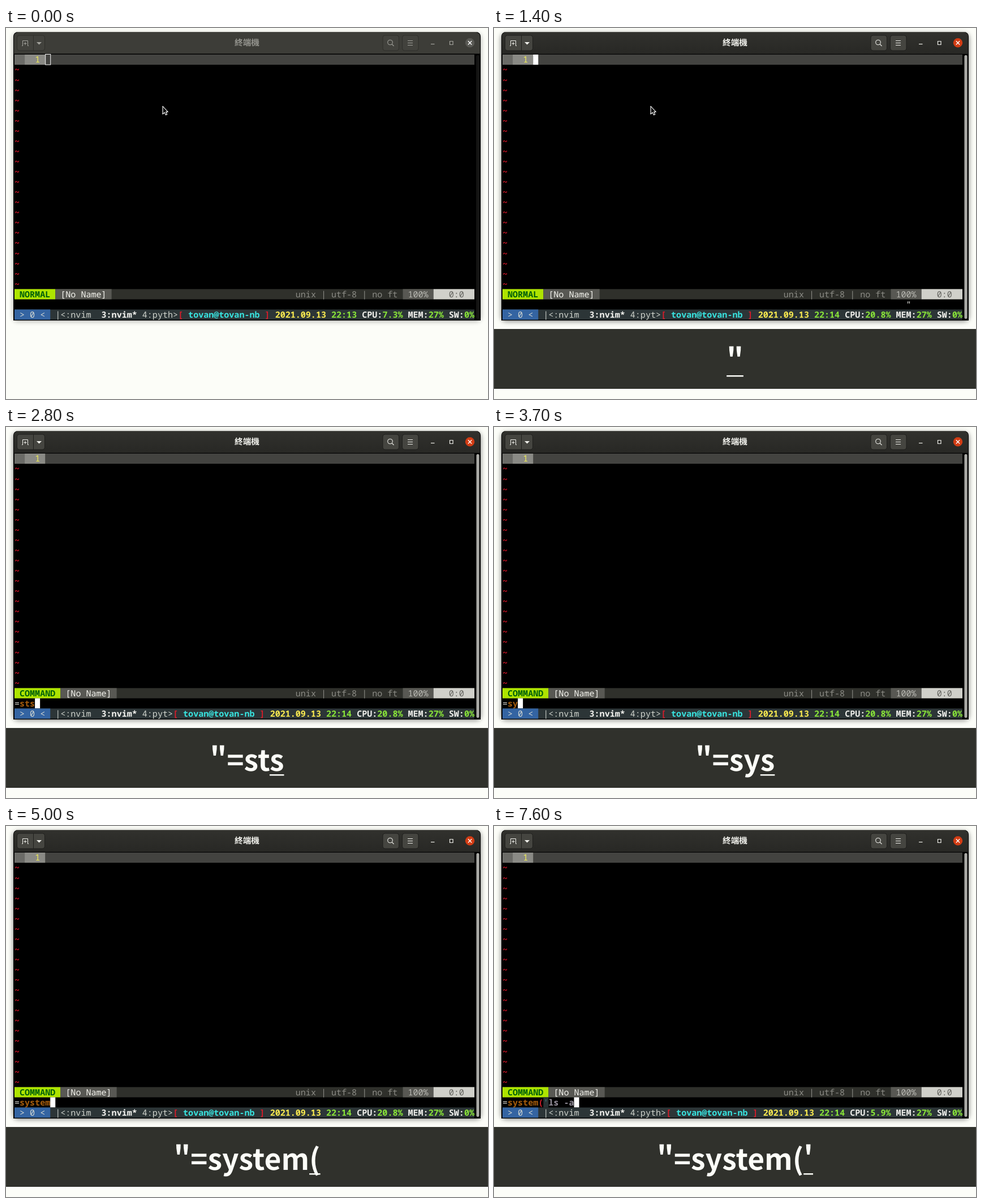
Write an HTML page that moves like this. It is 852 px wide and 657 px high and loops after 8 s.

```html
<!DOCTYPE html>
<html lang="zh-Hant">
<head>
<meta charset="utf-8">
<title>Terminal</title>
<style>
  html, body { margin: 0; width: 100%; height: 100%; overflow: hidden; background: #fcfdf8; }
  svg { display: block; width: 852px; height: 657px; }
  text { white-space: pre; text-rendering: geometricPrecision; }
  .mono { font: 15.055px "Noto Sans Mono", "DejaVu Sans Mono", monospace; }
  .bold { font-weight: 700; }
  .title { font: 700 14.7px "Noto Sans CJK TC", "Noto Sans CJK JP", "Noto Sans CJK", sans-serif; text-anchor: middle; }
  .caption { font: 700 51.5px "Noto Sans CJK TC", "Noto Sans CJK JP", "Noto Sans CJK", sans-serif; text-anchor: middle; }
</style>
</head>
<body>
<svg viewBox="0 0 852 657">
  <defs>
    <filter id="blur" x="-10%" y="-10%" width="120%" height="120%"><feGaussianBlur stdDeviation="5"/></filter>
    <linearGradient id="litBar" x1="0" y1="0" x2="0" y2="1">
      <stop offset="0" stop-color="#31312d"/><stop offset="1" stop-color="#282825"/>
    </linearGradient>
  </defs>
  <rect width="852" height="657" fill="#fcfdf8"/>
  <rect id="shadow" x="13" y="10" width="826" height="509" rx="8" filter="url(#blur)"/>
  <path d="M13 518V15a8 8 0 0 1 8-8H831a8 8 0 0 1 8 8V518Z" fill="#000"/>
  <g id="idle"></g>
  <g id="lit"></g>
  <rect x="831" y="48" width="6" height="467" rx="3" fill="#141413"/>
  <rect id="thumb" x="831.5" y="48" width="5" height="467" rx="2.5" fill="#aaaaa6"/>
  <g id="screen"></g>
  <path id="pointer" d="M277 138.5V152.5L280.2 149.6L282.3 154L284.7 153L282.7 148.6H286.3Z"
        fill="#111" stroke="#fff" stroke-width="1.1" stroke-linejoin="round"/>
  <g id="band">
    <rect y="533" width="852" height="106" fill="#30312c"/>
    <text id="keys" class="caption" x="426" y="608.5" fill="#fcfdf8"></text>
    <rect id="mark" y="615" height="2.5" fill="#fcfdf8"/>
  </g>
</svg>
<script>
const LOOP = 8000, LEFT = 15, TOP = 47, CW = 9.033, RH = 18.06;
const $ = id => document.getElementById(id);
const esc = s => s.replace(/&/g, '&amp;').replace(/</g, '&lt;').replace(/>/g, '&gt;');

// [time, text, last key underlined]
const KEYS = [
  [1400, '"', 1], [1600, '"=', 1], [1800, '"=', 0], [2000, '"=s', 1], [2200, '"=s', 0],
  [2600, '"=st', 1], [2800, '"=sts', 1], [3300, '"=st', 0], [3400, '"=s', 0],
  [3700, '"=sys', 1], [3900, '"=sys', 0], [4000, '"=syst', 1], [4200, '"=syste', 1],
  [4300, '"=system', 1], [4500, '"=system', 0], [5000, '"=system(', 1], [5200, '"=system(\'', 1]
];
const COMMANDS = [
  [1600, '='], [2200, '=s'], [2600, '=st'], [2800, '=sts'], [3400, '=st'], [3500, '=s'],
  [3700, '=sy'], [3900, '=sys'], [4200, '=syst'], [4300, '=syste'], [4500, '=system'],
  [5300, '=system('], [5500, "=system('"], [6000, "=system('l"], [6300, "=system('ls"],
  [6400, "=system('ls "], [6600, "=system('ls -a"], [7300, "=system('ls -"],
  [7500, "=system('ls "], [7600, "=system('ls -a"]
];
const STATUS = [
  [0, '4:pyth>', '22:13', '7.3%'], [600, '4:pyt>', '22:14', '20.8%'], [7100, '4:pyth>', '22:14', '5.9%']
];
const FOCUS = [[0, 0], [600, .35], [700, .75], [800, 1]];
const at = (list, t) => list.filter(e => e[0] <= t).pop();

const box = (col, row, n, fill) =>
  `<rect x="${LEFT + col * CW}" y="${TOP + row * RH}" width="${n * CW}" height="${RH}" fill="${fill}"/>`;
const type = (col, row, s, fill, bold) =>
  `<text class="mono${bold ? ' bold' : ''}" x="${LEFT + col * CW}" y="${TOP + row * RH + 14.4}" fill="${fill}">${esc(s)}</text>`;

function header(lit) {
  const ink = lit ? '#f1f1ec' : '#a3a39d', face = lit ? '#454540' : '#42423d', edge = lit ? '#1f1f1c' : '#2e2e2a';
  const button = (x, w) =>
    `<rect x="${x}" y="13" width="${w}" height="27" rx="4" fill="${face}" stroke="${edge}"/>`;
  const line = (d, w = 1) => `<path d="${d}" fill="none" stroke="${ink}" stroke-width="${w}"/>`;
  return `<path d="M14 45.5V15a7 7 0 0 1 7-7H831a7 7 0 0 1 7 7V45.5Z" fill="${lit ? 'url(#litBar)' : '#3d3d38'}"/>
    <path d="M19 7.5H833" stroke="${lit ? '#474742' : '#484843'}"/>
    ${button(19.5, 49)}<path d="M48.5 13V40" stroke="${edge}"/>
    ${line('M28 31.5H29.5V22.5H38.5V31.5H40M34 25V30M31.5 27.5H36.5')}
    <path d="M54 25H63L58.5 29.5Z" fill="${ink}"/>
    ${button(666, 28.5)}<circle cx="679" cy="25.5" r="4.3" fill="none" stroke="${ink}" stroke-width="1.1"/>
    ${line('M682.2 28.7L685.5 32', 1.2)}
    ${button(700.5, 28.5)}${line('M710 22.5H719M710 26.5H719M710 30.5H719')}
    ${line('M751 28.5H757.5', 1.2)}${line('M784.5 23.5H790V29.5H784.5Z', 1.2)}
    <circle cx="820" cy="26.3" r="8.2" fill="${lit ? '#d23c14' : '#595954'}"/>
    <path d="M816.8 23.1L823.2 29.5M823.2 23.1L816.8 29.5" stroke="#fff" stroke-width="1.4"/>
    <text class="title" x="426" y="31.3" fill="${lit ? '#f4f4ef' : '#94948e'}">終端機</text>`;
}

function editor(command, pending, focused) {
  let s = box(0, 0, 90, '#434340') + box(0, 0, 2, '#6b6b67') + box(2, 0, 4, '#8a8a85') + type(4, 0, '1', '#f0ee58');
  for (let r = 1; r < 23; r++) s += type(0, r, '~', '#dc1428', true);
  if (!command) {
    s += focused ? box(6, 0, 1, '#fff')
      : `<rect x="${LEFT + 6 * CW + .5}" y="${TOP - .5}" width="${CW}" height="${RH + .5}" fill="none" stroke="#fff"/>`;
  }
  const mode = command ? 'COMMAND' : 'NORMAL', n = mode.length + 2;
  s += box(0, 23, 90, '#2f302b') + box(0, 23, n, '#aee400') + type(1, 23, mode, '#00600a', true);
  s += box(n, 23, 11, '#585853') + type(n + 1, 23, '[No Name]', '#f4f4ee');
  s += type(55, 23, 'unix | utf-8 | no ft', '#8b8b85');
  s += box(76, 23, 6, '#585853') + type(77, 23, '100%', '#b9b9b3');
  s += box(82, 23, 8, '#d0d0ca') + type(85, 23, '0:0', '#62625d');
  return s + (pending ? type(79, 24, '"', '#e8e8e2') : '') + (command ? prompt(command) : '');
}

function prompt(command) {
  let s = type(0, 24, '=', '#d8d8d2') + type(1, 24, command.slice(1, 7), '#a55c0c', true);
  if (command.length > 7) s += type(7, 24, '(', '#d41e2c', true);
  if (command.length > 8) s += box(8, 24, 1, '#293335') + type(8, 24, "'", '#3d7f80');
  return s + type(9, 24, command.slice(9), '#96909c', true) + box(command.length, 24, 1, '#fff');
}

function statusBar([, tab, clock, cpu]) {
  let col = 25, s = box(0, 25, 90, '#2c3537') + box(0, 25, 7, '#3464a2');
  s += type(1, 25, '> 0 <', '#d5d9d2') + type(8, 25, '|<:nvim', '#cfd3cc') + type(17, 25, '3:nvim*', '#f4f4f0', true);
  const green = '#8ae639', white = '#f0f0ec', red = '#d81c2a';
  const parts = [
    [tab, '#cfd3cc'], ['[ ', red], ['tovan@tovan-nb', '#38e4e0'], [' ] ', red],
    ['2021.09.13 ', '#fcec50'], [clock + ' ', green], ['CPU:', white], [cpu + ' ', green],
    ['MEM:', white], ['27% ', green], ['SW:', white], ['0%', green]
  ];
  parts.forEach(([word, fill], i) => {
    s += type(col, 25, word, fill, i > 0);
    col += word.length;
  });
  return s;
}

function caption(entry) {
  $('band').style.display = entry ? '' : 'none';
  if (!entry) return;
  const [, word, recent] = entry, keys = $('keys'), mark = $('mark');
  keys.textContent = word;
  const last = keys.getSubStringLength(word.length - 1, 1);
  mark.setAttribute('x', 426 + keys.getComputedTextLength() / 2 - last);
  mark.setAttribute('width', last);
  mark.style.display = recent ? '' : 'none';
}

let shown = '';
function render(t) {
  const key = at(KEYS, t), cmd = at(COMMANDS, t), status = at(STATUS, t), focus = at(FOCUS, t)[1];
  const state = [key, cmd, status, focus].join('|');
  if (state === shown) return;
  shown = state;
  $('lit').style.opacity = $('thumb').style.opacity = focus;
  $('shadow').style.opacity = .32 + .2 * focus;
  $('pointer').style.display = cmd ? 'none' : '';
  $('screen').innerHTML = editor(cmd && cmd[1], key && !cmd, focus > 0) + statusBar(status);
  caption(key);
}

$('idle').innerHTML = header(false);
$('lit').innerHTML = header(true);
const start = performance.now();
function tick() {
  render((performance.now() - start) % LOOP);
  requestAnimationFrame(tick);
}
tick();
</script>
</body>
</html>
```
